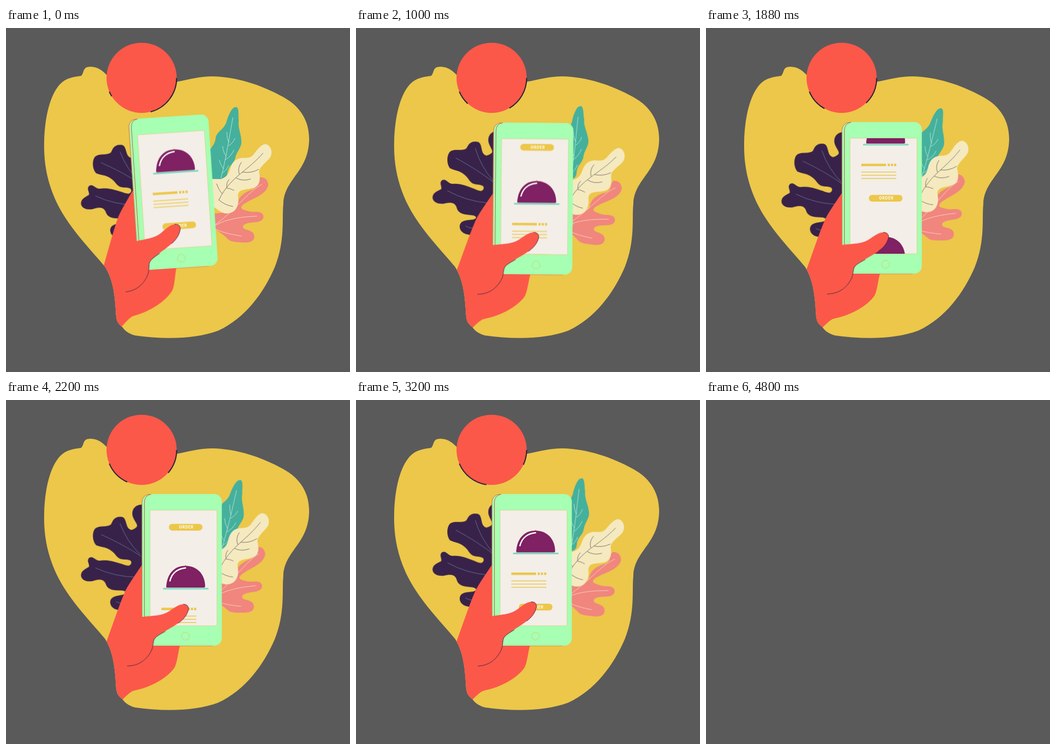
An HTML page for the animation above (4840 ms loop, 640 px wide and 640 px high).

```html
<!DOCTYPE html>
<html lang="en">
<head>
<meta charset="utf-8">
<title>Order by phone</title>
<style>
html, body { margin: 0; width: 100%; height: 100%; overflow: hidden; background: #5a5a5b; }
svg { display: block; width: 100%; height: 100%; }
.scene, .sway, .fan, .arm, .thumb, .item, .ring {
  animation: 4840ms cubic-bezier(.333, 0, .667, 1) infinite;
}
.scene { animation-name: scene; animation-timing-function: step-end; }
.sway { animation-name: sway; }
.fan { animation-name: fan; transform-origin: 297px 360px; }
.arm { animation-name: arm; transform-origin: 164px 553px; }
.thumb { animation-name: thumb; transform-origin: 230px 468px; }
.item { animation-name: scroll; }
.ring { animation-name: ring; animation-timing-function: linear; }
.teal { --a: -4.1deg; transform-origin: 398px 290px; }
.cream { --a: 3.6deg; transform-origin: 370px 328px; }
.pink { --a: 3.6deg; transform-origin: 375px 400px; }
.vein { fill: none; stroke-width: 1; stroke-linecap: round; }
text { font: 700 7px Inter, Roboto, sans-serif; letter-spacing: .6px; fill: #fff; text-anchor: middle; }

@keyframes scene { 0% { opacity: 1; } 99.17%, 100% { opacity: 0; } }
@keyframes sway {
  0% { transform: rotate(0deg); }
  20.66%, 61.98% { transform: rotate(var(--a)); }
  41.32%, 82.64% { transform: rotate(calc(var(--a) * -1)); }
  100% { transform: rotate(calc(var(--a) * .5)); }
}
@keyframes fan {
  0%, 46.5%, 92% { transform: rotate(-3.8deg); }
  13.4%, 26.9%, 67.1% { transform: rotate(.5deg); }
  100% { transform: rotate(-3.2deg); }
}
@keyframes arm {
  0% { transform: rotate(-3.8deg); }
  13.2% { transform: rotate(1.25deg); }
  26%, 100% { transform: rotate(0deg); }
}
@keyframes thumb {
  0%, .41%, 28.95%, 55%, 100% { transform: rotate(0deg); }
  14.67%, 42% { transform: rotate(3.2deg); }
}
@keyframes scroll {
  0%, .41% { transform: translateY(-1.5px); }
  28.95%, 29.07% { transform: translateY(-200px); }
  55%, 100% { transform: translateY(-414px); }
}
@keyframes ring { 0% { stroke-dashoffset: 125; } 99.17%, 100% { stroke-dashoffset: 200; } }
</style>
</head>
<body>
<svg viewBox="0 0 640 640">
  <defs>
    <path id="blob" d="M140 89C146 83 142 72 157 72C172 72 181 81 189 89C215 130 285 102 318 100C340 96 360 90 384 90C430 91 475 106 515 128C550 147 564 175 564 207C563 268 518 280 516 327C513 355 520 395 500 445C480 492 445 540 395 563C350 580 290 579 240 572C228 569 220 562 217 557C208 550 206 545 205 537C203 505 201 470 184 444C160 415 120 375 97 330C78 292 70 255 71 212C72 165 82 125 100 105C112 92 127 91 140 89Z"/>
    <clipPath id="inBlob"><use href="#blob"/></clipPath>
    <clipPath id="inScreen"><rect x="268" y="205" width="124.5" height="215"/></clipPath>
    <g id="card">
      <circle cx="334" cy="237.5" r="1.5" fill="#ecc749"/>
      <path fill="#7f2163" d="M298 277C300 250 315 238 334 238C354 238 370 252 370.500 276Q370.500 278.500 368 278.500L300 278.500Q298 278.500 298 277Z"/>
      <path fill="none" stroke="#fff" stroke-width="2.500" stroke-linecap="round" d="M305 266C309 250 321 243 334 242"/>
      <rect x="292" y="279" width="85" height="3" rx="1.500" fill="#7fd8bf"/>
      <g fill="#ecc749">
        <path d="M289 316h46v4.500h-46zM338 316h4v4.500h-4zM344 316h4v4.500h-4zM350 316h4v4.500h-4z"/>
        <path stroke="#ecc749" stroke-width="1.400" d="M289 331.500h65M289 337.500h65M289 343.500h65"/>
        <rect x="303" y="374" width="62.500" height="12.500" rx="6.200"/>
      </g>
      <text x="335.500" y="382.800">ORDER</text>
    </g>
  </defs>

  <g class="scene">
    <use href="#blob" fill="#ecc749"/>

    <g class="fan">
      <path fill="#38224a" d="M260 192C246 194 243 206 246 215C249 224 256 230 250 234C244 238 240 240 235 233C231 224 233 212 222 212C211 211 208 218 204 225C196 231 180 224 173 232C167 240 168 255 174 262C182 266 192 266 200 273C210 280 210 289 220 291C230 293 238 292 237 299C235 306 228 304 220 300C205 295 195 290 180 291C170 291 168 281 160 284C153 289 160 296 158 301C150 305 142 308 142 317C143 327 155 329 163 328C175 325 184 325 187 335C190 347 202 348 215 349C225 350 226 355 218 357C208 359 193 357 193 371C194 382 205 386 220 386L285 386L285 192Z"/>
      <path class="vein" stroke="#64718c" d="M185 243Q225 264 256 288M221 225Q231 258 254 284M170 304Q205 323 245 326M204 369Q211 374 222 373"/>
    </g>

    <g class="sway teal">
      <path fill="#45b09c" d="M424 148C417 153 412 168 410 175C405 190 392 192 390 205C389 215 384 220 378 228L378 281L402 281C412 280 411 272 413 265C416 255 425 252 427 240C430 228 439 222 438 210C437 195 431 185 433 172C432 160 434 148 428 147Z"/>
      <path class="vein" stroke="#b5e3d8" d="M422 167C416 200 410 240 400 279M411 194Q411 208 415 213M426 205Q422 215 414 219M403 220Q404 232 410 239M424 227Q418 240 408 245M397 246Q399 256 405 262M414 256Q410 266 403 269"/>
    </g>
    <g class="sway pink">
      <path fill="#f0867d" d="M472 278C465 282 470 295 460 300C445 305 432 312 430 330C425 342 405 345 375 345L375 368C395 376 405 385 412 392C418 399 430 398 440 399C455 400 462 396 462 388C462 378 452 377 444 374C439 371 440 366 447 364C458 360 478 364 479 351C478 338 462 344 452 341C440 338 428 335 450 323C465 315 485 308 488 292C487 280 478 277 472 278Z"/>
      <path class="vein" stroke="#fbd0c5" d="M476 291C450 304 425 342 386 368M467 350C440 351 410 355 390 367M438 387C418 384 404 381 387 373"/>
    </g>
    <g class="sway cream">
      <path fill="#f5e9bf" d="M482 216C474 217 468 226 460 236C452 244 445 241 437 242C425 244 420 252 417 262C414 274 408 278 400 281L375 281L375 325C388 333 398 343 408 345C422 346 430 338 432 325C434 315 428 310 436 303C446 298 460 301 468 293C474 285 472 276 471 268C471 258 485 250 492 240C498 228 490 216 482 216Z"/>
      <path class="vein" stroke="#77746d" d="M478 233C465 248 452 258 440 268C425 280 408 295 396 320M438 250Q430 260 434 272M470 263Q455 271 440 268M455 281Q440 286 428 279M415 282Q409 289 411 297M424 302Q416 298 411 298M392 290Q396 302 402 308M396 320Q408 330 422 332"/>
    </g>

    <g clip-path="url(#inBlob)">
      <g class="arm">
        <path fill="#fb5849" d="M262 294C245 318 230 340 222 355C208 388 198 420 186 452L186 590L200 572L217 557Q232 542 237 541C270 534 300 518 314 497C319 486 320 470 324 455L324 420L280 300Z"/>
        <rect x="253" y="175.500" width="144" height="281.500" rx="14" fill="#a6ffb2" stroke="#e8603f" stroke-width="1"/>
        <rect x="257.500" y="175" width="144" height="282" rx="14" fill="#a6ffb2"/>
        <path fill="none" stroke="#b5673f" stroke-width="1" d="M257.500 420V190Q258 177 270 175.500"/>
        <rect x="268" y="205" width="124.500" height="215" fill="#f3eee8" stroke="#dfcc80" stroke-width=".8"/>
        <g clip-path="url(#inScreen)">
          <g class="item">
            <use href="#card"/>
            <use href="#card" y="205"/>
            <use href="#card" y="419"/>
          </g>
        </g>
        <circle cx="334" cy="439.500" r="7.300" fill="none" stroke="#d3cd78" stroke-width=".9"/>
        <g class="thumb">
          <path fill="#fb5849" d="M236 405L253 402C272 399 285 399 298 391C308 384 315 377 325 375.500C333 375 337 380 335.500 386C333 398 324 407 314 414C300 424 285 432 276 441C272 446 274 454 271 463C263 482 248 494 227 495L215 460Z"/>
          <path fill="none" stroke="#3a2147" stroke-width=".9" stroke-linecap="round" d="M326 375.500C333 375 337 380 335.500 386C333 397 326 405 318 411M294 428C287 432 280 436 276 441C272 446 274 454 271 463C263 482 248 494 227 495"/>
        </g>
      </g>
    </g>

    <circle cx="252.300" cy="92.700" r="65.300" fill="#fb5849"/>
    <path class="ring" fill="none" stroke="#2a1f3d" stroke-width="2" pathLength="157" stroke-dasharray="200 73.500 200 0" d="M317.500 93A65.200 65.200 0 0 1 192.200 118.300"/>
  </g>
</svg>
</body>
</html>
```
